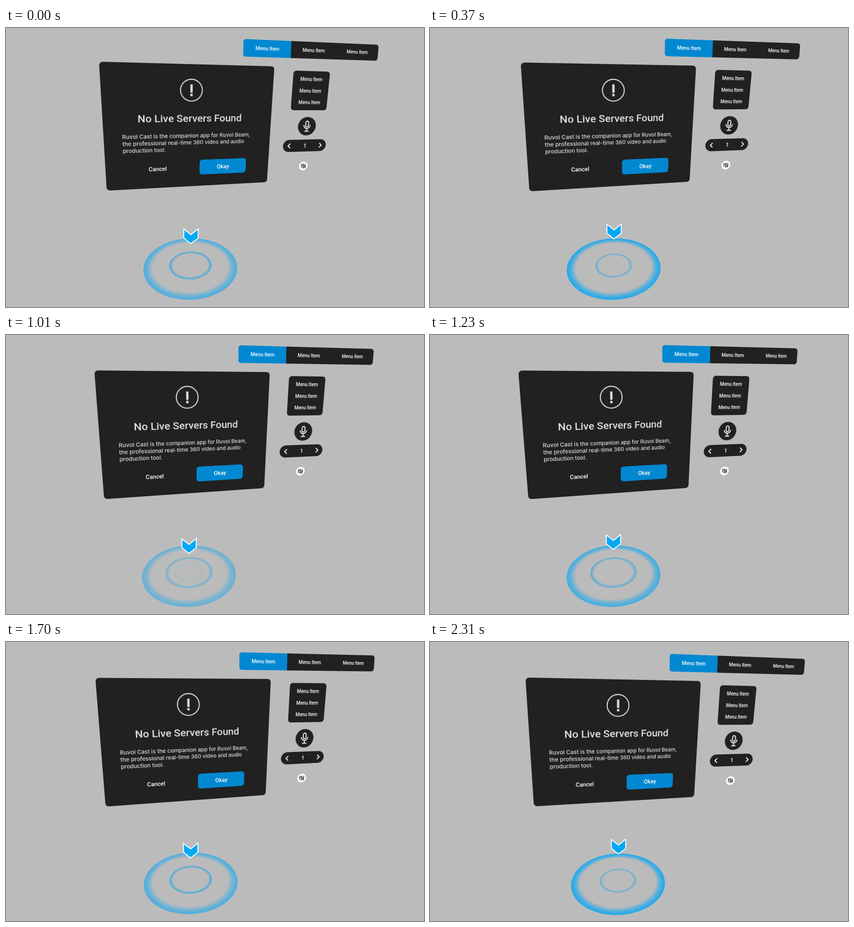
Write an HTML page that moves like this. It is 917x611 px and loops after 2630 ms.

```html
<!DOCTYPE html>
<html lang="en">
<head>
<meta charset="utf-8">
<title>Floating menus</title>
<style>
html, body { margin: 0; width: 100%; height: 100%; overflow: hidden; background: #bbb; }
#scene { position: absolute; left: 0; top: 0; width: 917px; height: 611px; transform-origin: 400px 300px; }
svg { position: absolute; left: 0; top: 0; transform-origin: 0 0; overflow: visible; }
text { font: 500 14px Roboto, sans-serif; fill: #fff; text-anchor: middle; }
.body text { font: 500 13.1px Inter, sans-serif; fill: #dedede; text-anchor: start; }
.line { fill: none; stroke: #fff; stroke-width: 2; }
.dark { fill: #212121; }
.blue { fill: #0288d1; }
</style>
</head>
<body>
<div id="scene">
  <svg width="917" height="611">
    <defs>
      <radialGradient id="wide" fy=".475" fr=".4">
        <stop offset="0" stop-color="#08a6f5" stop-opacity="0"/>
        <stop offset=".55" stop-color="#08a6f5" stop-opacity=".7"/>
        <stop offset="1" stop-color="#08a6f5"/>
      </radialGradient>
      <radialGradient id="thin" fy=".49" fr=".41">
        <stop offset="0" stop-color="#08a0ee" stop-opacity="0"/>
        <stop offset=".65" stop-color="#08a0ee" stop-opacity=".85"/>
        <stop offset="1" stop-color="#08a0ee" stop-opacity=".85"/>
      </radialGradient>
    </defs>
    <circle id="outer" r="1" fill="url(#wide)"/>
    <circle id="young" r="1" fill="url(#thin)"/>
    <circle id="old" r="1" fill="url(#thin)"/>
    <path id="arrow" d="M-15.7 -32.5L.2 -20.5L16 -33.5V-13L0 -1L-15.3 -13Z" fill="#03a9f4" stroke="#fff" stroke-width="2"/>
  </svg>
</div>
<script>
const get = id => document.getElementById(id);
const scene = get('scene');
const label = (x, y, s, size = 14) => `<text x="${x}" y="${y}" style="font-size:${size}px">${s}</text>`;

// Projects a w × h drawing onto four corners, clockwise from top left.
function plane(w, h, [x0, y0, x1, y1, x2, y2, x3, y3], content) {
  const ax = x1 - x2, bx = x3 - x2, sx = x0 - x1 + x2 - x3;
  const ay = y1 - y2, by = y3 - y2, sy = y0 - y1 + y2 - y3;
  const den = ax * by - bx * ay;
  const p = (sx * by - bx * sy) / den, q = (ax * sy - sx * ay) / den;
  const m = [
    (x1 - x0 + p * x1) / w, (y1 - y0 + p * y1) / w, 0, p / w,
    (x3 - x0 + q * x3) / h, (y3 - y0 + q * y3) / h, 0, q / h,
    0, 0, 1, 0,
    x0, y0, 0, 1
  ].map(v => v.toFixed(9));
  scene.insertAdjacentHTML('beforeend',
    `<svg width="${w}" height="${h}" style="transform:matrix3d(${m})">${content}</svg>`);
}

const body = [
  'Ruvol Cast is the companion app for Ruvol Beam,',
  'the professional real-time 360 video and audio',
  'production tool.'
];

// Dialog
plane(400, 300, [196, 78.5, 581, 81, 569.5, 335, 218.5, 360.5], `
  <rect class="dark" width="400" height="300" rx="8"/>
  <circle class="line" cx="200" cy="59.7" r="25.4" style="stroke:#dcdcdc;stroke-width:2.4"/>
  <path d="M197.3 46h5.4v19.5h-5.4zM197.3 68h5.4v5.5h-5.4z" fill="#dcdcdc"/>
  <g opacity=".86">${label(200, 135.3, 'No Live Servers Found', 24.7)}</g>
  <g class="body">${body.map((s, i) => `<text x="40.5" y="${174.4 + 17 * i}">${s}</text>`).join('')}</g>
  <rect class="blue" x="221" y="231" width="119" height="39" rx="7"/>
  ${label(119.5, 255.8, 'Cancel')}${label(280.4, 255.8, 'Okay')}`);

// Menu bar
plane(300, 35, [512, 22.5, 809, 29.5, 806.5, 64.5, 512, 61], `
  <rect class="dark" width="300" height="35" rx="6"/>
  <path class="blue" d="M100 0H6Q0 0 0 6V29Q0 35 6 35H100Z"/>
  ${[50, 150, 250].map(x => label(x, 21.5, 'Menu Item', 10.4)).join('')}`);

// Side column: menu, microphone, stepper, mute
plane(100, 216, [613, 89.4, 713.2, 90.6, 694.8, 305, 601.5, 311], `
  <rect class="dark" x="10" width="80" height="81" rx="6"/>
  ${[0, 1, 2].map(i => label(50, 20 + 24.1 * i, 'Menu Item', 10.1)).join('')}
  <g transform="translate(49.3 115.6)">
    <circle class="dark" r="20.2"/>
    <path class="line" d="M-3.2 -8a3.2 3.2 0 0 1 6.4 0v6a3.2 3.2 0 0 1 -6.4 0zM-7.2 -2.5a7.2 7.2 0 0 0 14.4 0M0 5v5.5M-5 10.8h10"/>
  </g>
  <g transform="translate(48 158.5)">
    <rect class="dark" x="-49.2" y="-13.5" width="98.4" height="27" rx="13.5"/>
    <path class="line" d="M-33 -5l-5 5 5 5M33.5 -5l5 5 -5 5"/>
    ${label(.5, 4, '1', 12)}
  </g>
  <g transform="translate(49 205.4)">
    <circle r="10.2" fill="#fff"/>
    <path class="line" style="stroke:#212121;stroke-width:1.2" d="M-5 -2h2.5l3 -3v10l-3 -3H-5zM-5.5 -5.5l11 11M2.8 -2q1.6 2 0 4M3 -5q4.5 5 0 10"/>
  </g>`);

const LOOP = 2630;
const starts = [0, 60, 370, 610, 1010, 1230, 1380, 1700, 2000, 2310];

// Head sway: step, shift x, shift y, roll
const sway = [
  [0, 3.6, -.7, 1.12],
  [4, -3, -.4, .2],
  [6, -2.1, -.6, -.1],
  [7, 0, 0, 0],
  [9, 10.3, 2, .78]
];

function camera(step) {
  const n = sway.findIndex(k => k[0] > step);
  if (n < 0) return sway.at(-1).slice(1);
  const a = sway[n - 1], b = sway[n], u = (step - a[0]) / (b[0] - a[0]);
  return a.map((v, i) => v + (b[i] - v) * u).slice(1);
}

function ring(id, y, r, alpha) {
  get(id).setAttribute('transform', `translate(405.2 ${y}) rotate(-3.4) scale(${r} ${r * .653})`);
  get(id).setAttribute('opacity', alpha);
}

// Small rings start every seven steps, shrink ever faster and fade.
function ripple(id, age) {
  const alpha = .6 * Math.sin(Math.PI * (age + 2) / 9.5);
  ring(id, 520.8, Math.max(0, 52 - .9 * age ** 1.6), Math.max(0, alpha));
}

function draw() {
  const now = performance.now() % LOOP;
  const step = starts.findLastIndex(s => s <= now);
  const [x, y, roll] = camera(step);
  scene.style.transform = `translate(${x}px, ${y}px) rotate(${roll}deg)`;

  const bounce = Math.cos(2 * Math.PI * (step - 2.42) / 3.5);
  get('arrow').setAttribute('transform', `translate(404.9 ${470.3 - 9.7 * bounce})`);
  ring('outer', 528.5, 103, .71 + .23 * bounce);

  const age = (step + 3) % 7;
  ripple('young', age);
  ripple('old', age + 7);
  requestAnimationFrame(draw);
}
draw();
</script>
</body>
</html>
```
